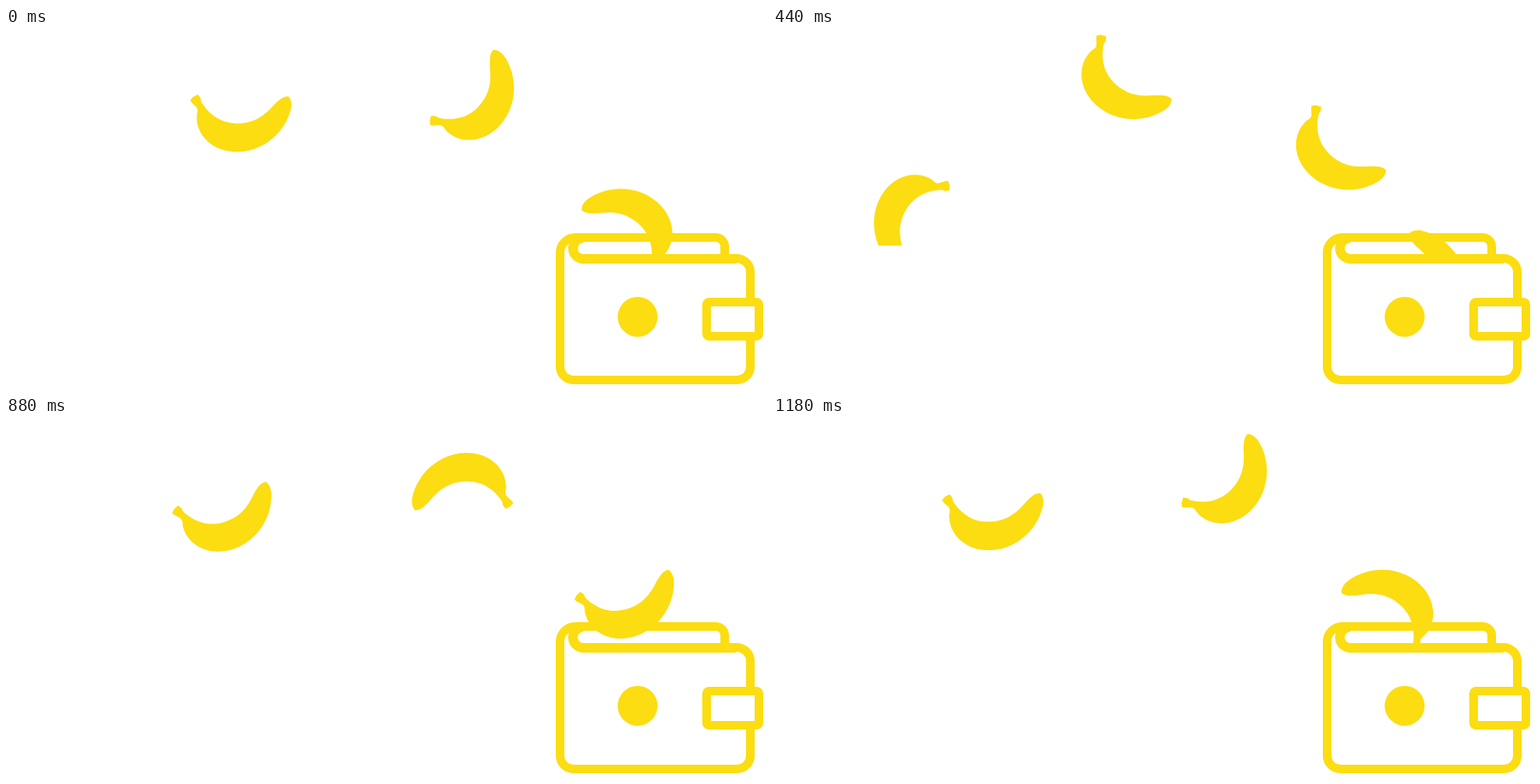
An HTML page for the animation above (1.2 s loop, 800 px wide and 380 px high).

```html
<!DOCTYPE html>
<html lang="en">
<head>
<meta charset="utf-8">
<title>Bananas into a wallet</title>
<style>
html, body { margin: 0; width: 100%; height: 100%; overflow: hidden; background: #fff; }
svg { display: block; width: 100vw; height: 100vh; }
</style>
</head>
<body>
<svg viewBox="0 0 800 380">
  <defs>
    <clipPath id="open">
      <rect width="400" height="229"/>
      <rect x="400" width="400" height="242"/>
    </clipPath>
    <path id="banana" d="M-52-20L-49-23.5L-44-26L-41-22Q-41.5-19-39-16C-30-3-18 4-3 4C17 4 28-7 36-16C42-22 46-25 51-25C54-23 55-17 54-12C48 14 24 34-3 34C-28 34-45 17-45-2C-45-7-43-9-45-12C-47-15-51-17-52-20Z"/>
  </defs>
  <g id="flock" clip-path="url(#open)" fill="#fbdd11"></g>
  <g fill="none" stroke="#fbdd11" stroke-width="9">
    <path d="M755.5 242V230A9.5 9.5 0 0 0 746 220.5H598.5A16 16 0 0 0 582.5 236.5V356.5A14 14 0 0 0 596.5 370.5H768.5A14 14 0 0 0 782.5 356.5V257A14.5 14.5 0 0 0 768 242.5"/>
    <path d="M607 221A11 11 0 0 0 607 243H768" stroke-width="10"/>
    <rect x="736.5" y="288.5" width="55" height="36" rx="2.5" fill="#fff"/>
  </g>
  <circle cx="664" cy="304" r="21" fill="#fbdd11"/>
</svg>
<script>
const LOOP = 1200, STEP = 20;

// Flight path, one point per 100 ms
const path = [
  [82, 310], [122, 227.5], [175, 154.5], [245.5, 96.5], [330, 64], [416, 56.5], [496, 77.5],
  [567, 114], [620, 161], [660, 207], [686, 252], [705, 294], [722, 375]
];

// Time offset, start angle and spin in degrees per ms
const bananas = [
  { lead: 300, angle: -28.8, spin: 0.098 },
  { lead: 600, angle: 11.85, spin: -0.0985 },
  { lead: 900, angle: 100.2, spin: 0.135 },
  { lead: 0, angle: 101.3, spin: -0.132 }
];

const flock = document.getElementById("flock");
for (const b of bananas) {
  b.el = document.createElementNS("http://www.w3.org/2000/svg", "use");
  b.el.setAttribute("href", "#banana");
  flock.appendChild(b.el);
}

const point = i => path[Math.max(0, Math.min(path.length - 1, i))];

// Catmull-Rom interpolation along the path
function place(ms) {
  const i = Math.floor(ms / 100), k = ms / 100 - i;
  const [a, b, c, d] = [-1, 0, 1, 2].map(n => point(i + n));
  return [0, 1].map(n => b[n] + 0.5 * k * (c[n] - a[n]
    + k * (2 * a[n] - 5 * b[n] + 4 * c[n] - d[n]
    + k * (3 * (b[n] - c[n]) + d[n] - a[n]))));
}

function draw(now) {
  const t = Math.floor(now / STEP) * STEP;
  for (const b of bananas) {
    const age = (t + b.lead) % LOOP;
    const [x, y] = place(age);
    const turn = b.angle + b.spin * age;
    b.el.setAttribute("transform", `translate(${x.toFixed(2)} ${y.toFixed(2)}) rotate(${turn.toFixed(2)})`);
  }
}

const start = performance.now();
function tick() {
  draw(performance.now() - start);
  requestAnimationFrame(tick);
}
draw(0);
requestAnimationFrame(tick);
</script>
</body>
</html>
```
